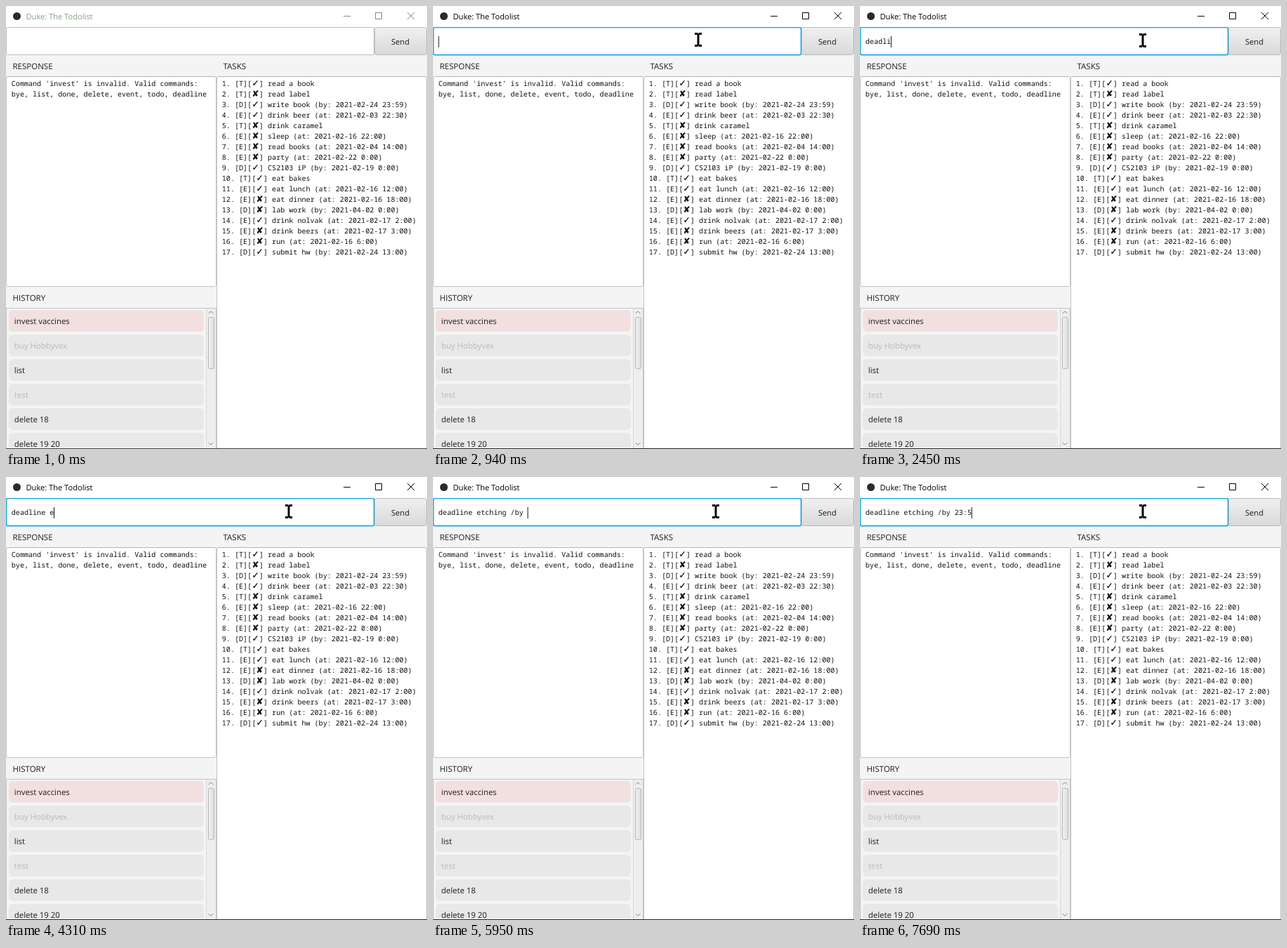
Write an HTML page that moves like this. It is 600 by 631 pixels and loops after 8 s.

```html
<!DOCTYPE html>
<html lang="en">
<head>
<meta charset="utf-8">
<title>Todolist</title>
<style>
  html, body { margin: 0; width: 100%; height: 100%; overflow: hidden; background: #f4f4f4; }
  svg { display: block; }
  text { white-space: pre; text-rendering: geometricPrecision; fill: #1c1c1c; }
  .ui { font-family: "Open Sans", "Noto Sans", sans-serif; }
  .title { font-size: 11.1px; }
  .head { font-size: 11.5px; }
  .item { font-size: 11.4px; }
  .faded { fill: #b9b9b9; }
  .mono { font: 10.083px "Noto Sans Mono", "DejaVu Sans Mono", monospace; fill: #111; }
  .mark { font: 12px "DejaVu Sans", sans-serif; text-anchor: middle; fill: #111; stroke: #111; stroke-width: .25; }
  .pane { fill: #fff; stroke: #c4c4c4; }
  .thin { fill: none; stroke: #8a8a8a; }
</style>
</head>
<body>
<svg width="600" height="631" viewBox="0 0 600 631">
  <defs>
    <linearGradient id="button" x2="0" y2="1">
      <stop stop-color="#f0f0f0"/><stop offset="1" stop-color="#d9d9d9"/>
    </linearGradient>
    <linearGradient id="thumb">
      <stop stop-color="#f1f1f1"/><stop offset="1" stop-color="#dedede"/>
    </linearGradient>
    <clipPath id="listClip"><rect x="1" y="431" width="285" height="198"/></clipPath>
  </defs>

  <rect width="600" height="631" fill="#f4f4f4"/>
  <rect x=".5" y="30.5" width="524" height="39" rx="2.5" fill="#fff" stroke="#bdbdbd"/>
  <g id="focus">
    <rect x="-.2" y="29.8" width="525.4" height="40.4" rx="3" fill="#039ed3"/>
    <rect x="1" y="31" width="523" height="38" rx="2" fill="#fff"/>
    <rect x="-1.4" y="28.6" width="527.8" height="42.8" rx="4" fill="#039ed3" opacity=".13"/>
    <rect x="3" y="33" width="519" height="34" fill="#fff"/>
  </g>
  <rect width="600" height="30" fill="#fff"/>
  <circle cx="15.5" cy="14.5" r="5.5" fill="#2b2b2b"/>
  <text id="title" class="ui title" x="28.5" y="18.7">Duke: The Todolist</text>
  <path id="controls" fill="none" d="M481 14.5h10M526.5 9.5h9v9h-9zM572 9l10 10M582 9l-10 10"/>

  <rect x="525.5" y="30.5" width="74" height="39" rx="3" fill="url(#button)" stroke="#b9b9b9"/>
  <text class="ui" font-size="11.2" x="562" y="55" text-anchor="middle">Send</text>
  <text id="typed" class="mono" x="7.8" y="54"></text>
  <rect id="caret" y="43" width="1" height="16" fill="#111"/>

  <text class="ui head" x="9.5" y="90">RESPONSE</text>
  <text class="ui head" x="309.5" y="90">TASKS</text>
  <text class="ui head" x="9.5" y="419.5">HISTORY</text>
  <rect class="pane" x=".5" y="100.5" width="299" height="299" rx="2.5"/>
  <rect class="pane" x="300.5" y="100.5" width="299" height="530" rx="2.5"/>
  <path d="M2 100.5h296M302 100.5h296" stroke="#b4b4b4"/>
  <text class="mono" x="7.8" y="114">Command 'invest' is invalid. Valid commands:</text>
  <text class="mono" x="7.8" y="129">bye, list, done, delete, event, todo, deadline</text>
  <g id="tasks"></g>

  <rect x=".5" y="430.5" width="299" height="200" fill="#f4f4f4" stroke="#c4c4c4"/>
  <g id="history" clip-path="url(#listClip)"></g>
  <rect x="286" y="431" width="13" height="199" fill="#eee"/>
  <path d="M285.5 431v199" stroke="#d6d6d6"/>
  <rect x="288.5" y="443.5" width="8" height="73" rx="2" fill="url(#thumb)" stroke="#b5b5b5"/>
  <path class="thin" d="M288.5 438l3.5-3 3.5 3M288.5 622l3.5 3 3.5-3"/>
  <path id="edge" d="M0 630.5h600"/>
  <path id="pointer" fill="none" stroke="#000" stroke-width="3"
    d="M-5 -8.5h4.4M.6 -8.5h4.4M0 -8.5v17M-5 8.5h4.4M.6 8.5h4.4"/>
</svg>
<script>
const LOOP = 8000, CHAR = 6.05, MARK = 10.8, FOCUS = 940, KEY_GAP = 110, BLINK = 480;

// Kind, done or not, description
const tasks = [
  "T+read a book", "T-read label", "D+write book (by: 2021-02-24 23:59)",
  "E+drink beer (at: 2021-02-03 22:30)", "T-drink caramel",
  "E-sleep (at: 2021-02-16 22:00)", "E-read books (at: 2021-02-04 14:00)",
  "E-party (at: 2021-02-22 0:00)", "D+CS2103 iP (by: 2021-02-19 0:00)",
  "T+eat bakes", "E+eat lunch (at: 2021-02-16 12:00)",
  "E-eat dinner (at: 2021-02-16 18:00)", "D-lab work (by: 2021-04-02 0:00)",
  "E+drink nolvak (at: 2021-02-17 2:00)", "E-drink beers (at: 2021-02-17 3:00)",
  "E-run (at: 2021-02-16 6:00)", "D+submit hw (by: 2021-02-24 13:00)"
];
const entries = ["invest vaccines", "buy Hobbyvex", "list", "test", "delete 18", "delete 19 20"];

// Each burst types its keys at an even pace from its start time.
const bursts = {
  1800: "de", 2120: "adlin", 2900: "e", 3120: " ", 4310: "et", 4640: "ching ",
  5410: "/", 5630: "by", 5950: " ", 6710: "23", 7050: ":", 7590: "59"
};
const keys = Object.entries(bursts).flatMap(([start, text]) =>
  [...text].map((char, i) => ({ char, time: +start + i * KEY_GAP })));

const $ = id => document.getElementById(id);

function set(el, attrs) {
  for (const key in attrs) el.setAttribute(key, attrs[key]);
}

function add(parent, tag, attrs, content = "") {
  const el = document.createElementNS("http://www.w3.org/2000/svg", tag);
  set(el, attrs);
  el.textContent = content;
  parent.append(el);
}

tasks.forEach((task, i) => {
  const left = 307.8, y = 114 + i * 15;
  const prefix = `${i + 1}. [${task[0]}][`;
  const x = left + prefix.length * CHAR;
  add($("tasks"), "text", { class: "mono", x: left, y }, prefix);
  add($("tasks"), "text", { class: "mark", x: x + MARK / 2, y }, task[1] === "+" ? "✓" : "✘");
  add($("tasks"), "text", { class: "mono", x: x + MARK, y }, "] " + task.slice(2));
});

entries.forEach((entry, i) => {
  const y = 433 + i * 35;
  const faded = /^(buy|test)/.test(entry) ? " faded" : "";
  add($("history"), "rect", { x: 4, y, width: 278, height: 31, rx: 6, fill: i ? "#e8e8e8" : "#f2e0e0" });
  add($("history"), "text", { class: "ui item" + faded, x: 11.8, y: y + 20 }, entry);
});

const progress = (t, start, ticks) =>
  Math.min(1, Math.max(0, Math.floor((t - start) / 105) / ticks));

function draw(t) {
  const active = t >= FOCUS;
  $("title").style.fill = active ? "#000" : "#83a283";
  set($("controls"), { stroke: active ? "#000" : "#868686" });
  set($("edge"), { stroke: active ? "#222" : "#3f3f3f" });
  set($("focus"), { opacity: +active });

  const typed = keys.filter(key => key.time <= t);
  const idle = t - (typed.at(-1)?.time ?? FOCUS);
  const shown = active && Math.floor(idle / BLINK) % 2 === 0;
  $("typed").textContent = typed.map(key => key.char).join("");
  set($("caret"), { x: 7.55 + typed.length * CHAR, opacity: +shown });

  const enter = progress(t, 500, 2), drift = progress(t, FOCUS, 2);
  const x = 400 - 22 * enter + 25 * drift;
  set($("pointer"), { transform: `translate(${x} ${48 + drift})`, opacity: +(t >= 500) });
}

const start = performance.now();
function tick(now) {
  draw(Math.max(0, now - start) % LOOP);
  requestAnimationFrame(tick);
}
draw(0);
requestAnimationFrame(tick);
</script>
</body>
</html>
```
